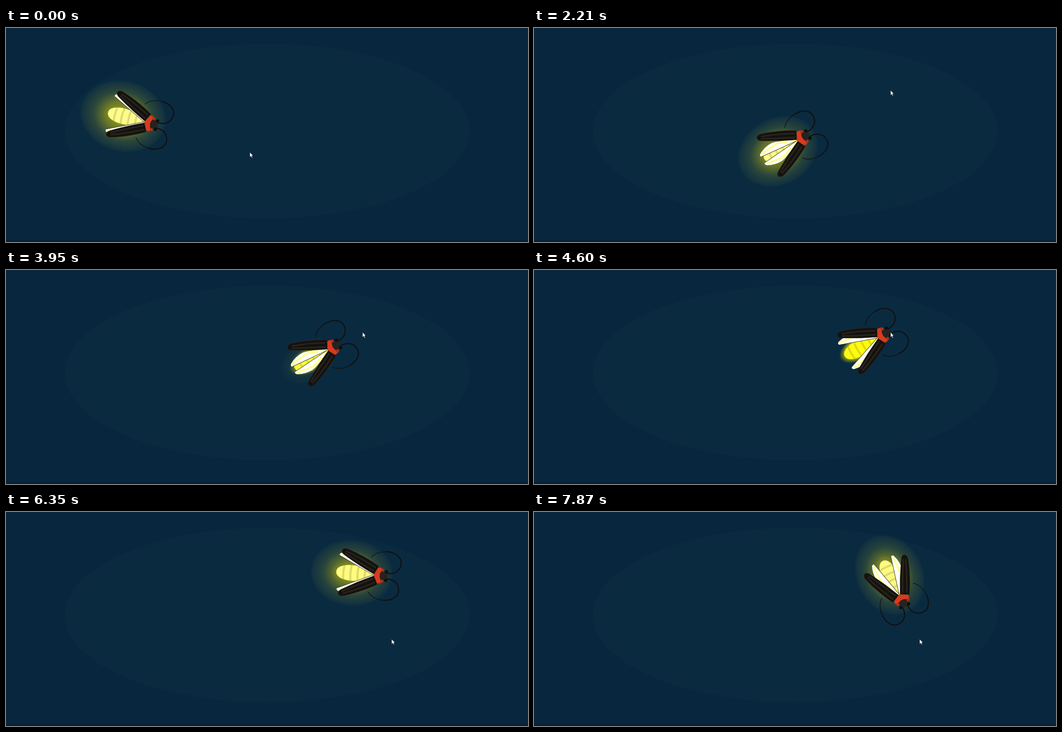
Animation, 1167 px wide and 480 px high, one loop 7.99 s. Source, as an HTML page:

```html
<!DOCTYPE html>
<html lang="en">
<head>
<meta charset="utf-8">
<title>Firefly</title>
<style>
html, body { margin: 0; width: 100%; height: 100%; overflow: hidden; background: #08263d; }
svg { display: block; width: 1167px; height: 480px; }
</style>
</head>
<body>
<svg viewBox="0 0 1167 480">
  <defs>
    <radialGradient id="wide">
      <stop offset="0" stop-color="#dcd408" stop-opacity=".6"/>
      <stop offset=".42" stop-color="#d8d00c" stop-opacity=".47"/>
      <stop offset=".7" stop-color="#c8cc20" stop-opacity=".18"/>
      <stop offset="1" stop-color="#b0c030" stop-opacity=".04"/>
    </radialGradient>
    <radialGradient id="near">
      <stop offset=".62" stop-color="#ff0" stop-opacity=".8"/>
      <stop offset=".82" stop-color="#f4f000" stop-opacity=".4"/>
      <stop offset="1" stop-color="#e0e000" stop-opacity="0"/>
    </radialGradient>
    <clipPath id="belly"><path d="M-55 0C-55-12-38-18-18-17.5C5-17 25-8 30 0C25 8 5 17-18 17.5C-38 18-55 12-55 0Z"/></clipPath>
    <g id="wing">
      <path d="M0 0H-86Q-90 3-86 7Q-70 18-52 18.5Q-34 17 0 0Z" fill="#fff"/>
      <path d="M-84 5L-44 13L-20 6" fill="none" stroke="#ffff8c" stroke-width="4"/>
      <path d="M0 0H-86" stroke="#37331b"/>
    </g>
    <g id="cover">
      <path d="M0 10.5C-25 13-62 11-82 7Q-91 3-88-3Q-86-7-78-7.5Q-40-11 0-10Z" fill="#15110d" stroke="#2c200f" stroke-width=".8"/>
      <path d="M-5 4.5Q-42 6-78 2M-5-4.5Q-42-5-78-3" fill="none" stroke="#27241f" stroke-width="3.4" stroke-linecap="round"/>
    </g>
    <g id="feeler" fill="none" stroke="#110f0d" stroke-linecap="round">
      <path d="M60 6C77 6 88 16 88 31C88 46 72 54.5 55 54.5" stroke-width="2.4"/>
      <path d="M55 54.5C41 54.5 27 49 20 39" stroke-width="1.4"/>
    </g>
  </defs>

  <rect width="1167" height="480" fill="#08263d"/>
  <ellipse cx="584" cy="231" rx="453" ry="196" fill="#0a2a40"/>
  <rect y="476.5" width="1167" height="3.5" fill="#061f34"/>

  <g id="fly">
    <ellipse id="halo" cx="-20" fill="url(#wide)"/>
    <ellipse id="rim" cx="-15" rx="52" ry="28" fill="url(#near)"/>
    <g clip-path="url(#belly)">
      <rect id="body" x="-56" y="-20" width="90" height="40"/>
      <g id="bands" fill="none" stroke="#6e6420" stroke-opacity=".22" stroke-width="4.5"></g>
    </g>
    <g id="right"></g>
    <g id="left" transform="scale(1 -1)"></g>
    <path d="M29 0L38-17Q44-19 51-14V14Q44 19 38 17Z" fill="#d93a20"/>
    <path d="M44-17.5L51-14V-9H45ZM44 17.5L51 14V9H45Z" fill="#b03019"/>
    <path d="M45-9.5H56Q60-5 60 0Q60 5 56 9.5H45Q40 0 45-9.5Z" fill="#26231f"/>
    <g fill="#0f0e0d"><circle cx="57" cy="-9.6" r="3.7"/><circle cx="57" cy="9.6" r="3.7"/></g>
  </g>
  <path id="cursor" d="M0 0V11.4L2.6 9L4.5 13L6.3 12.2L4.5 8.2H7.8Z" fill="#fff" stroke="#0a1420" stroke-width=".8"/>
</svg>
<script>
const LOOP = 7990;
const BEAT = 245, PULSE = 542;   // wing beat and glow periods
const FOLD = 230;                // time to open or close the covers

const $ = id => document.getElementById(id);
const set = (el, attrs) => { for (const k in attrs) el.setAttribute(k, attrs[k]); };
const ramp = (t, from, to) => Math.min(1, Math.max(0, (t - from) / (to - from)));
const easeOut = (p, power) => 1 - (1 - p) ** power;
const wave = (t, zero, period) => Math.cos(2 * Math.PI * (t - zero) / period);

// Both sides share the same parts; the left one is mirrored.
const part = name => `<use href="#${name}" class="${name}"/>`;
for (const side of ['right', 'left']) $(side).innerHTML = ['wing', 'cover', 'feeler'].map(part).join('');
const wings = document.querySelectorAll('.wing');
const covers = document.querySelectorAll('.cover');

for (let x = -37; x < 20; x += 16) $('bands').innerHTML += `<path d="M${x} -20q-4 20 0 40"/>`;

// The fly glows and beats its wings only while turning or flying.
const flights = [
  { from: -FOLD, to: 800, beat: -122, pulse: 0 },
  { from: 1370, to: 5270, beat: 23, pulse: 4329 },
  { from: 5895, to: LOOP + FOLD, beat: 88, pulse: 6296 },
];

function draw(t) {
  // Three straight legs, each after the first preceded by a turn on the spot.
  const [a, b, c] = [ramp(t, 0, 800), ramp(t, 1936, 5270), ramp(t, 7390, 10720)];
  const x = 281 + 261 * a + 251 * b + 75 * c;
  const y = 203 + 75.5 * a - 140 * b + 142 * c;
  const turn = 15 - 44.5 * ramp(t, 1370, 1936) + 93.5 * ramp(t, 5895, 7120);

  const open = Math.max(...flights.map(f => ramp(t, f.from, f.from + FOLD) - ramp(t, f.to, f.to + FOLD)));
  const flight = flights.find(f => t >= f.from && t < f.to);
  const fold = flight ? 15 - 11 * wave(t, flight.beat, BEAT) : 4;
  const glow = flight ? .5 + .5 * wave(t, flight.pulse, PULSE) : 0;

  // The pointer makes two moves.
  const first = ramp(t, 350, 1280);
  const second = ramp(t, 4700, 5400);
  const px = 545 + 252 * easeOut(first, 3.2) + 65 * second;
  const py = 278.5 - 139 * easeOut(first, 2) + 145.5 * second;

  set($('fly'), { transform: `translate(${x} ${y}) rotate(${turn})` });
  set($('halo'), { rx: 50 + 46 * glow, ry: 28 + 50 * glow, opacity: glow });
  set($('rim'), { opacity: flight ? 1 - .85 * glow : 0 });
  set($('body'), { fill: `rgb(254,251,${Math.round(16 + 122 * glow)})` });
  wings.forEach(w => set(w, { transform: `translate(28 0) rotate(${-fold})` }));
  covers.forEach(w => set(w, { transform: `translate(34 11) rotate(${-2 - 24 * open})` }));
  set($('cursor'), { transform: `translate(${px} ${py})` });
}

const start = performance.now();
function frame() {
  draw((performance.now() - start) % LOOP);
  requestAnimationFrame(frame);
}
frame();
</script>
</body>
</html>
```
